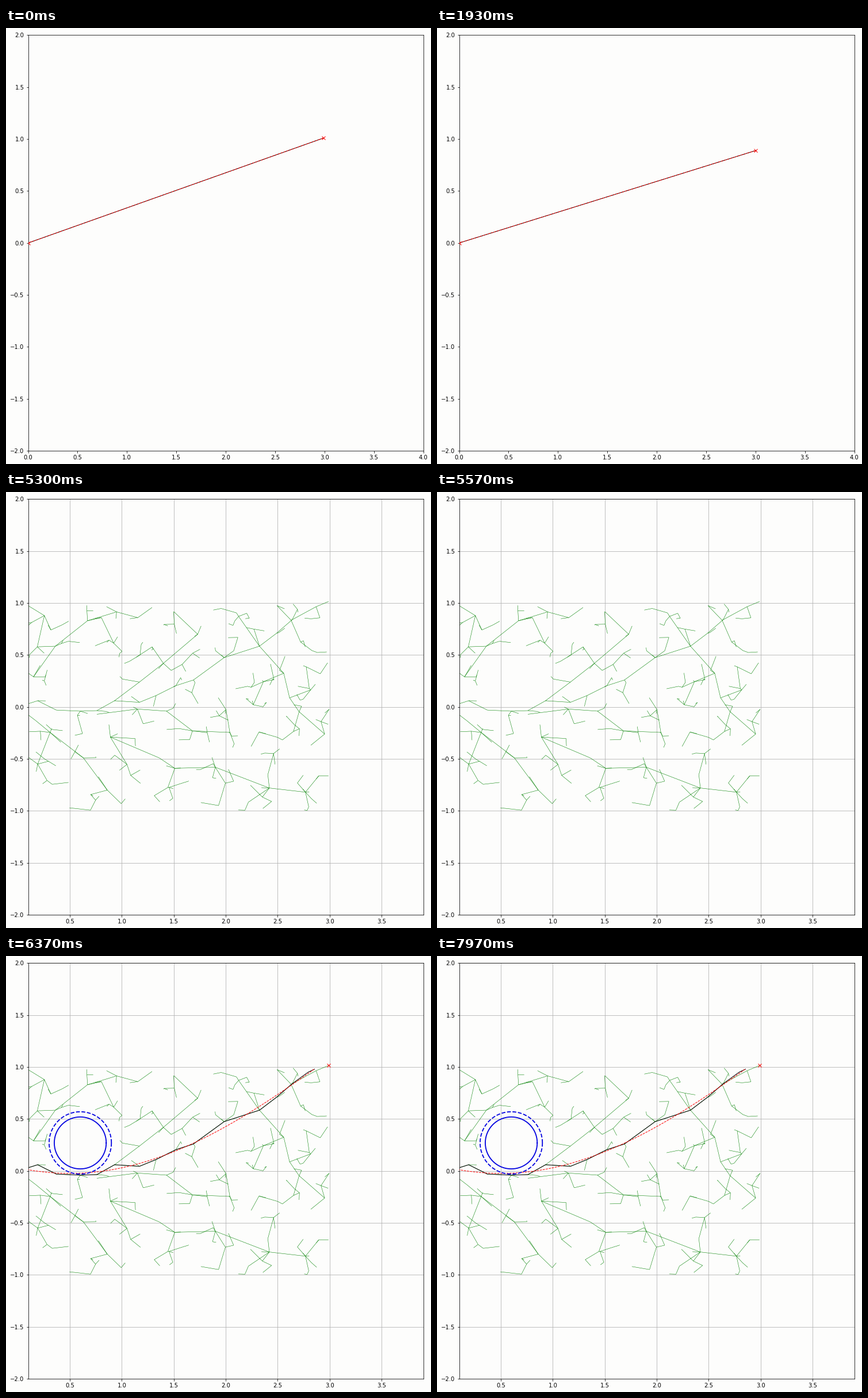
Animation, 739 px wide and 758 px high, one loop 8000 ms. Source, as a matplotlib script:

```python
import math

import numpy as np
import matplotlib.pyplot as plt
from matplotlib.animation import FuncAnimation
from matplotlib.collections import LineCollection

W, H, DPI = 739, 758, 72
FRAMES, LOOP_MS = 240, 8000
ENTER, FREEZE, TREE, SOLVED = 58, 83, 159, 176

BG = "#fdfdfc"
BLUE = "#0000e0"
GOAL = (2.99, 1.015)
DISC = (0.6, 0.27)
RADIUS, MARGIN = 0.25, 0.30
STEP, NODES = 0.35, 340

# Corners of the route found by the search, and of the tree's main limbs.
ROUTE = [(0, 0), (.19, .06), (.37, -.03), (.6, -.04), (.76, -.035),
         (.93, .06), (1.17, .045), (1.33, .11), (1.52, .205), (1.69, .26),
         (1.985, .475), (2.325, .585), (2.49, .71), (2.64, .84),
         (2.795, .952), (2.855, .98)]
LIMBS = [
    [(.93, .06), (1.17, .24), (1.4, .42), (1.73, .7)],
    [(0, 0), (.17, -.13), (.31, -.245), (.63, -.49), (.86, -.8)],
    [(.15, .29), (.36, .585), (.67, .83), (.95, .915)],
    [(.76, -.07), (1.15, -.02), (1.43, -.04), (1.68, -.23), (2.04, -.245)],
    [(.89, -.29), (1.36, -.49), (1.51, -.59), (1.9, -.58), (2.42, -.78)],
    [(2.64, .84), (2.87, .965), GOAL],
]

plt.rcParams.update({"font.family": "DejaVu Sans", "font.size": 10})
fig = plt.figure(figsize=((W + 0.01) / DPI, (H + 0.01) / DPI), dpi=DPI,
                 facecolor=BG)


def make_axes(x0, x1, first, last, grid):
    left, right, top, bottom = 38.52, 725.51, 12.47, 735.03
    ax = fig.add_axes([left / W, 1 - bottom / H,
                       (right - left) / W, (bottom - top) / H], facecolor=BG)
    ax.set_xlim(x0, x1)
    ax.set_ylim(-2, 2)
    ax.set_xticks(np.arange(first, last + 0.1, 0.5))
    ax.set_yticks(np.arange(-2, 2.1, 0.5))
    ax.grid(grid)
    return ax


def draw_route(ax):
    solid, = ax.plot([], [], "k-", lw=1, zorder=3)
    dashed, = ax.plot([], [], "r--", lw=1, zorder=4)
    marks, = ax.plot([], [], "rx", ms=6, mew=1, zorder=5)
    return solid, dashed, marks


def draw_rings(ax):
    return [ax.plot([], [], style, color=BLUE, lw=1.8, zorder=6)[0]
            for style in ("-", "--")]


def place_rings(rings, cx, cy):
    a = np.linspace(0, 2 * math.pi, 73)
    for ring, r in zip(rings, (RADIUS, MARGIN)):
        ring.set_data(cx + r * np.cos(a), cy + r * np.sin(a))


def hits_disc(a, b):
    points = a + np.linspace(0, 1, 8)[:, None] * (b - a)
    return np.hypot(*(points - DISC).T).min() < MARGIN


def grow_tree():
    """Rapidly exploring random tree, started from the main limbs."""
    rng = np.random.default_rng(4)
    edges, nodes = [], []
    for limb in [ROUTE[:-2]] + LIMBS:
        edges += zip(limb, limb[1:])
        nodes += limb
    nodes = np.array(nodes)
    while len(nodes) < NODES:
        sample = rng.uniform((0, -1), (3, 1))
        gaps = np.hypot(*(nodes - sample).T)
        near = nodes[gaps.argmin()]
        tip = near + (sample - near) * min(1, STEP / gaps.min())
        if not hits_disc(near, tip):
            edges.append((near, tip))
            nodes = np.vstack([nodes, tip])
    return edges


# First view: straight route and an approaching obstacle.
track_ax = make_axes(0, 4, 0, 4, False)
direct = draw_route(track_ax)
moving = draw_rings(track_ax)

# Second view: search tree and the route found in it.
tree_ax = make_axes(0.0985, 3.9015, 0.5, 3.5, True)
tree_ax.add_collection(
    LineCollection(grow_tree(), colors="g", linewidths=0.55, zorder=2),
    autolim=False)
found, eased, goal_mark = draw_route(tree_ax)
fixed = draw_rings(tree_ax)
solution = [found, eased, goal_mark, *fixed]

rx, ry = np.transpose(ROUTE)
found.set_data(rx, ry)
curve_x = np.linspace(0, rx[-1], 80)
eased.set_data(curve_x, np.polyval(np.polyfit(rx, ry, 4), curve_x))
goal_mark.set_data([GOAL[0]], [GOAL[1]])
place_rings(fixed, *DISC)


def goal_at(n):
    times = [1, 17, 27, 46, 58, 70, 83]
    heights = [1.01, 1.065, 1.065, 0.89, 0.89, 0.95, 0.925]
    return np.interp(n, [27, 83], [2.99, 3.015]), np.interp(n, times, heights)


def update(n):
    tracking = n < TREE
    track_ax.set_visible(tracking)
    tree_ax.set_visible(not tracking)
    gx, gy = goal_at(n)
    for artist in direct:
        artist.set_data([0, gx], [0, gy])
    p = np.clip((n - ENTER) / (FREEZE - ENTER), 0, 1)
    place_rings(moving, 0.68 - 0.075 * p, -2.35 + 2.22 * p)
    for artist in solution:
        artist.set_visible(n >= SOLVED)
    return []


anim = FuncAnimation(fig, update, frames=FRAMES, interval=LOOP_MS / FRAMES,
                     repeat=True, repeat_delay=0, blit=False)
plt.show()
```
